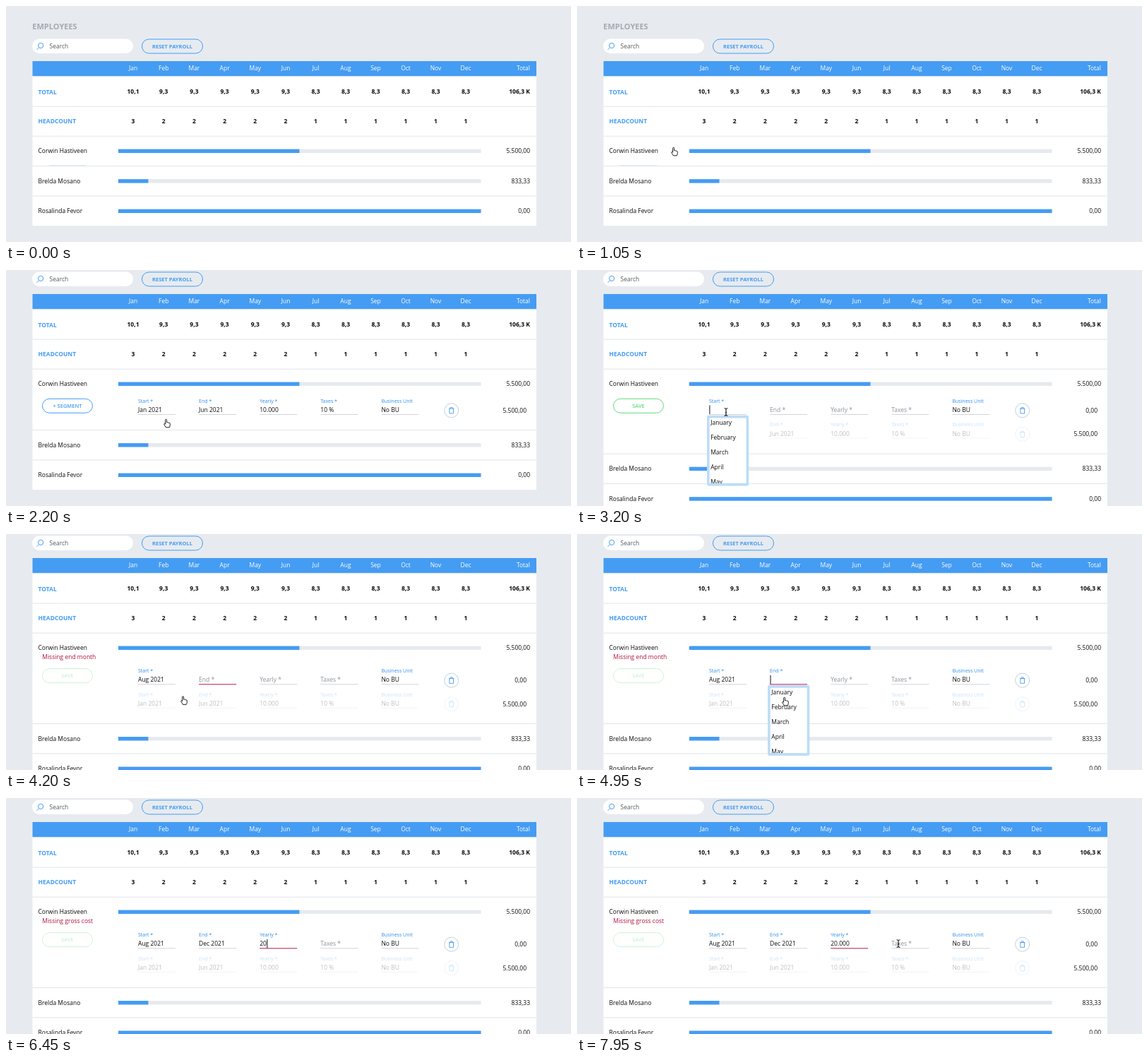
Animation of 800 by 334 pixels, one loop 8000 ms. Source, as an HTML page:

```html
<!DOCTYPE html>
<html lang="en">
<head>
<meta charset="utf-8">
<title>Payroll segments</title>
<style>
html, body { margin: 0; width: 100%; height: 100%; overflow: hidden; background: #e7ebf0; }
svg { display: block; width: 800px; height: 334px; }
text { font: 8.5px "Open Sans", "Noto Sans", sans-serif; fill: #0c0c0e; }
.bold { font-weight: 700; }
.title { font-size: 11px; font-weight: 700; fill: #a4a9b2; }
.blue { fill: #459cf3; }
.head { fill: #fff; }
.small { font-size: 7px; fill: #2f8fee; }
.btn { font-size: 7.5px; font-weight: 600; }
.soft { fill: #8d9298; }
.error { fill: #b3123f; }
</style>
</head>
<body>
<svg id="stage" viewBox="0 0 800 334" xmlns="http://www.w3.org/2000/svg"></svg>
<script>
const BLUE = '#459cf3', GREEN = '#5edb7c', RED = '#b8174a';
const LOOP = 8000, TICK = 50;
const OPEN = 1160, ADD = 2650, START = 3100, START_SET = 4000;
const END = 4550, END_SET = 5500, YEARLY = 6150;
const MONTHS = ['January', 'February', 'March', 'April', 'May', 'June', 'July',
  'August', 'September', 'October', 'November', 'December'];
const LABELS = ['Start *', 'End *', 'Yearly *', 'Taxes *', 'Business Unit'];
const KEYS = [[6400, '2'], [6450, '20'], [6600, '200'], [6800, '2.000'], [7000, '20.000']];

// time, centre x, centre y, shape
const POINTER = [
  [0, 258, 54, ''], [450, 258, 54, 'arrow'], [700, 160, 166, 'arrow'], [850, 160, 166, 'arrow'],
  [950, 149, 188, 'hand'], [1050, 138, 206, 'hand'], [1350, 138, 206, 'hand'],
  [1750, 262, 217, 'hand'], [2000, 264, 220, 'hand'], [2200, 228, 217, 'hand'],
  [2550, 92, 196, 'hand'], [2700, 92, 196, 'hand'], [3000, 211, 201, 'beam'],
  [3250, 211, 201, 'hand'], [3450, 206, 250, 'hand'], [3900, 206, 264, 'hand'],
  [4050, 206, 264, 'hand'], [4350, 298, 207, 'beam'], [4650, 298, 207, 'hand'],
  [4900, 295, 237, 'hand'], [5200, 295, 237, 'hand'], [5450, 297, 298, 'hand'],
  [5600, 297, 298, 'arrow'], [6050, 396, 206, 'beam'], [6400, 396, 206, ''],
  [7750, 396, 206, 'beam'], [7850, 425, 210, 'arrow'], [7900, 446, 207, 'beam'], [7950, 455, 206, 'beam']
];
const SHAPES = {
  arrow: ['M-3-6V5L-.5 2.6 1 6.2 2.6 5.5 1.1 2H4.5Z', '#111', '#fff', .8],
  hand: ['M-2.4 1.2V-4.6Q-2.4-5.8-1.4-5.8T-.4-4.6V-1.2Q.6-1.9 1.3-1Q2.3-1.6 2.9-.6Q4.3-1 4.3 .6V2.6' +
    'Q4.3 4 3.3 5.8H-1.6Q-2.6 4-4 1.8Q-4.6 .6-3.7 .3Q-3 .2-2.4 1.2Z', '#fff', '#1c1c1c', 1],
  beam: ['M-2.5-5.2Q0-5.2 0-4V4Q0 5.2-2.5 5.2M2.5-5.2Q0-5.2 0-4M0 4Q0 5.2 2.5 5.2M-1 .8H1', 'none', '#111', 1.1]
};

const clamp = p => Math.max(0, Math.min(1, p));
const easeOut = p => 1 - (1 - clamp(p)) ** 2;
const smooth = p => { p = clamp(p); return p * p * (3 - 2 * p); };

function el(parent, tag, attrs = {}, content) {
  const node = document.createElementNS('http://www.w3.org/2000/svg', tag);
  for (const k in attrs) node.setAttribute(k, attrs[k]);
  if (content) node.textContent = content;
  parent.append(node);
  return node;
}
const group = (parent, attrs) => el(parent, 'g', attrs);
const rect = (parent, x, y, width, height, fill, more) =>
  el(parent, 'rect', { x, y, width, height, fill, ...more });
// y is the middle of the capitals
const text = (parent, x, y, str, cls = '', anchor = 'start', drop = 3.1) =>
  el(parent, 'text', { x, y: y + drop, class: cls, 'text-anchor': anchor }, str);
const move = (node, x, y) => node.setAttribute('transform', `translate(${x} ${y})`);
const show = (node, on) => node.setAttribute('visibility', on ? 'visible' : 'hidden');
const fieldX = i => 187 + 86.1 * i;

function pill(parent, x, y, w, label, color) {
  const g = group(parent);
  rect(g, x, y, w, 20, 'none', { rx: 10, stroke: color });
  text(g, x + w / 2, y + 10, label, 'btn', 'middle', 2.7).style.fill = color;
  return g;
}

function person(parent, y, name, fill, total) {
  text(parent, 45.5, y, name);
  rect(parent, 159, y - 2.6, 513.5, 5.4, '#e6eaee');
  rect(parent, 159, y - 2.6, fill, 5.4, BLUE);
  text(parent, 742, y, total, '', 'end');
}

// One line of inputs; y = 0 is the middle of the values
function segment(parent, values, total) {
  const root = group(parent), body = group(root);
  const fields = LABELS.map((name, i) => {
    const x = fieldX(i);
    return {
      label: text(body, x, -12.6, name, 'small', 'start', 2.5),
      hint: text(body, x, 0, name, 'soft'),
      value: text(body, x, 0, values[i]),
      line: rect(body, x, 6, 53, 1, '#d2d5d9')
    };
  });
  const bin = group(body, { transform: 'translate(630.7 .8)', fill: 'none' });
  el(bin, 'circle', { r: 10, stroke: '#b9cbdc', 'stroke-width': .9 });
  el(bin, 'path', {
    d: 'M-3.8-2.6H3.8M-1.5-2.6V-4.2H1.5V-2.6M-2.8-2.6V4.2H2.8V-2.6', stroke: BLUE, 'stroke-width': .9
  });
  text(root, 737, .7, total, '', 'end');
  return { root, body, fields };
}

function setField(f, str, focused) {
  const filled = str !== '' || focused;
  f.value.textContent = str;
  show(f.label, filled);
  show(f.hint, !filled);
}

const stage = document.getElementById('stage');
rect(stage, 0, 0, 800, 334, '#e7ebf0');

// Everything above the second person
const top_ = group(stage);
text(top_, 37.3, 28.5, 'EMPLOYEES', 'title', 'start', 4);
rect(top_, 37, 46.5, 143, 20.5, '#fff', { rx: 10.2 });
el(top_, 'path', {
  d: 'M46.2 59.2L43.6 61.8M45.6 56a3.6 3.6 0 1 1 7.2 0a3.6 3.6 0 1 1-7.2 0',
  fill: 'none', stroke: BLUE
});
text(top_, 61.5, 57, 'Search').style.fill = '#55585c';
pill(top_, 192.5, 47, 86, 'RESET PAYROLL', BLUE).querySelector('text').style.fontWeight = 700;
rect(top_, 37.5, 78, 713.5, 340, '#fff');
rect(top_, 37.5, 78, 713.5, 21, BLUE);
rect(top_, 37.5, 99, 713.5, 1.4, '#dde5ed');
MONTHS.forEach((m, i) => {
  const x = 180 + 43.2 * Math.min(i, 5) + 42.5 * Math.max(0, i - 5);
  text(top_, x, 88, m.slice(0, 3), 'head', 'middle');
  text(top_, x, 121.3, i ? (i < 6 ? '9,3' : '8,3') : '10,1', 'bold', 'middle');
  text(top_, x, 163.2, i ? (i < 6 ? '2' : '1') : '3', 'bold', 'middle');
});
text(top_, 742, 88, 'Total', 'head', 'end');
text(top_, 45.5, 121.5, 'TOTAL', 'bold blue');
text(top_, 742, 121.3, '106,3 K', 'bold', 'end');
text(top_, 45.5, 163.2, 'HEADCOUNT', 'bold blue');
for (const y of [141.7, 183.7]) rect(top_, 37.5, y, 713.5, 1, '#e2e5e9');
person(top_, 205.2, 'Corwin Hastiveen', 256.5, '5.500,00');
const error = text(top_, 51.3, 217.7, '', 'error');

// Inputs, hidden behind the lower rows until opened
const detail = group(stage);
const older = segment(detail, ['Jan 2021', 'Jun 2021', '10.000', '10 %', 'No BU'], '5.500,00');
older.fields.forEach(f => show(f.hint, false));
const fresh = segment(detail, ['', '', '', '', 'No BU'], '0,00');
const addBtn = pill(detail, 51.5, -15.7, 71, '+ SEGMENT', BLUE);
const saveBtn = pill(detail, 51.5, -15.7, 71, 'SAVE', GREEN);
const caret = rect(detail, 0, -6.5, 1, 12.5, '#111');

const low = group(stage);
rect(low, 0, 226.5, 800, 200, '#e7ebf0');
rect(low, 37.5, 226.5, 713.5, 84.5, '#fff');
for (const y of [226, 268.3]) rect(low, 37.5, y, 713.5, 1, '#e2e5e9');
person(low, 247.7, 'Brelda Mosano', 42.5, '833,33');
person(low, 290.2, 'Rosalinda Fevor', 513.5, '0,00');

const menu = group(stage);
const clip = el(el(stage, 'defs'), 'clipPath', { id: 'list' });
rect(clip, 0, 3, 53, 93, '#000');
rect(menu, -1.2, 1.8, 55.6, 96, '#fff', { stroke: '#bddcf8', 'stroke-width': 3.6, rx: .5 });
const list = group(group(menu, { 'clip-path': 'url(#list)' }));
MONTHS.forEach((m, i) => text(list, 2.2, 10.3 + 21 * i, m));

const pointer = group(stage);
const icons = {};
for (const name in SHAPES) {
  const [d, fill, stroke, w] = SHAPES[name];
  icons[name] = el(pointer, 'path', { d, fill, stroke, 'stroke-width': w, 'stroke-linejoin': 'round' });
}

function drawPointer(t) {
  const i = POINTER.findLastIndex(k => k[0] <= t);
  const a = POINTER[i], b = POINTER[i + 1] || a;
  const p = a === b ? 0 : smooth((t - a[0]) / (b[0] - a[0]));
  move(pointer, a[1] + (b[1] - a[1]) * p, a[2] + (b[2] - a[2]) * p);
  for (const name in icons) show(icons[name], name === a[3]);
}

function drawForm(t, y) {
  const focus = t < START ? -1 : t < START_SET ? 0 : t < END ? -1 : t < END_SET ? 1 : t < YEARLY ? -1 : 2;
  const key = KEYS.findLast(k => k[0] <= t);
  const values = [t < START_SET ? '' : 'Aug 2021', t < END_SET ? '' : 'Dec 2021', key ? key[1] : '', '', 'No BU'];
  const invalid = t < START_SET ? -1 : t < END_SET ? 1 : 2;
  fresh.fields.forEach((f, i) => {
    setField(f, values[i], i === focus);
    f.line.setAttribute('fill', i === invalid ? RED : '#d2d5d9');
  });
  error.textContent = ['Missing end month', 'Missing gross cost'][invalid - 1] || '';

  const since = t - (key ? key[0] : [START, END, YEARLY][focus]);
  show(caret, focus >= 0 && since % 1000 < 500);
  if (focus >= 0) {
    const w = values[focus] ? fresh.fields[focus].value.getComputedTextLength() : 0;
    caret.setAttribute('x', fieldX(focus) + w + .4);
  }

  const open = focus === 0 || focus === 1;
  menu.setAttribute('display', open ? 'inline' : 'none');
  if (open) {
    move(menu, fieldX(focus), y + 7.8);
    move(list, 0, focus ? -159 * smooth((t - 5050) / 350) : -100 * smooth((t - 3500) / 350));
  }
}

function render(t) {
  const lift = 44 * easeOut((t - OPEN) / 300);
  const added = easeOut((t - ADD) / 300);
  const push = 8.3 * easeOut((t - START_SET) / 150);
  const y = 242 - lift + push;
  move(top_, 0, -lift);
  move(detail, 0, y);
  move(low, 0, 33.6 * added + push);
  move(older.root, 0, 33.5 * added);
  older.body.setAttribute('opacity', 1 - .74 * added);
  fresh.root.setAttribute('opacity', added);
  addBtn.setAttribute('display', t < ADD ? 'inline' : 'none');
  saveBtn.setAttribute('display', t < ADD ? 'none' : 'inline');
  saveBtn.setAttribute('opacity', t < START_SET ? 1 : .32);
  drawForm(t, y);
  drawPointer(t);
}

const began = performance.now();
function loop() {
  const t = (performance.now() - began) % LOOP;
  render(Math.floor(t / TICK) * TICK);
  requestAnimationFrame(loop);
}
loop();
</script>
</body>
</html>
```
